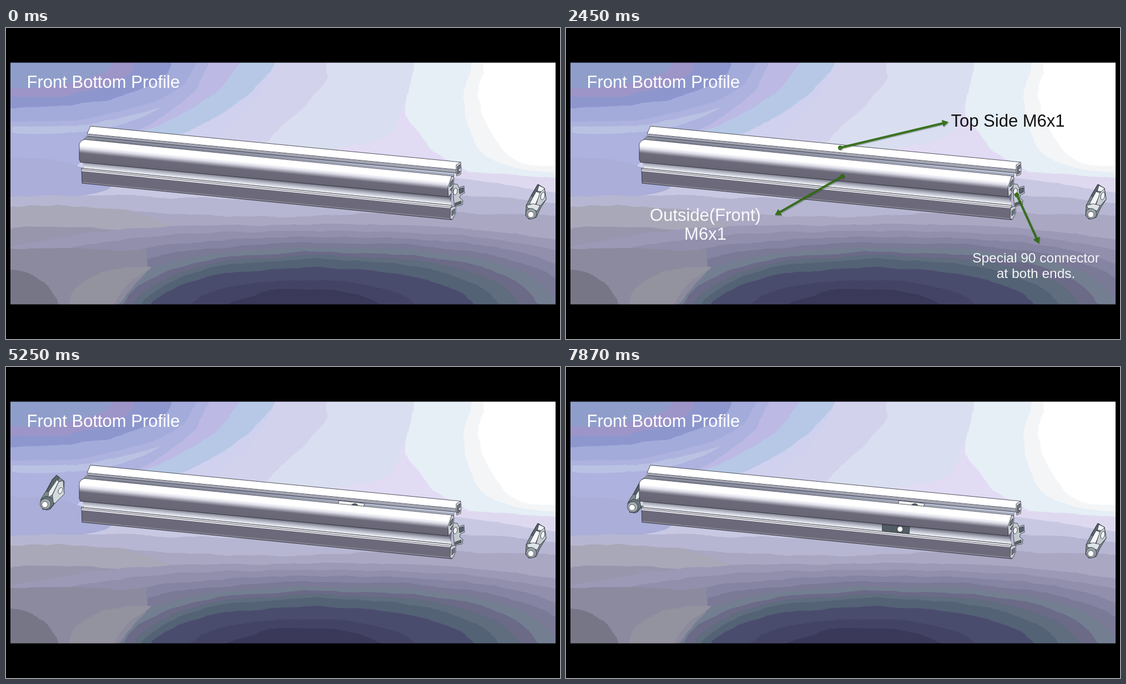
Animation of 998x561 px, one loop 8000 ms. Source, as an HTML page:

```html
<!DOCTYPE html>
<html lang="en">
<head>
<meta charset="utf-8">
<title>Front Bottom Profile</title>
<style>
html, body { margin: 0; width: 100%; height: 100%; overflow: hidden; background: #000; }
svg { display: block; width: 100vw; height: 100vh; }
text { font: 31px "Liberation Sans", Arial, sans-serif; }
.mid { text-anchor: middle; }
.small { font-size: 24.5px; }
.line { stroke: #2a2d35; stroke-width: .8; stroke-linejoin: round; }
</style>
</head>
<body>
<svg viewBox="0 0 998 561">
  <defs>
    <clipPath id="panel"><rect x="8" y="62.5" width="982" height="436"/></clipPath>
    <filter id="ragged" filterUnits="userSpaceOnUse" x="-40" y="20" width="1080" height="530" color-interpolation-filters="sRGB">
      <feTurbulence type="fractalNoise" baseFrequency=".012 .03" numOctaves="3" seed="8"/>
      <feDisplacementMap in="SourceGraphic" scale="9" xChannelSelector="R" yChannelSelector="G"/>
    </filter>
    <linearGradient id="front" gradientUnits="userSpaceOnUse" x1="500" y1="237" x2="496" y2="277">
      <stop offset=".28" stop-color="#fff"/><stop offset=".42" stop-color="#dadbe6"/>
      <stop offset=".62" stop-color="#6c6a7a"/><stop offset="1" stop-color="#686675"/>
    </linearGradient>
    <linearGradient id="slot" gradientUnits="userSpaceOnUse" x1="500" y1="276" x2="498.6" y2="290">
      <stop offset="0" stop-color="#70707f"/><stop offset=".35" stop-color="#a9acba"/>
      <stop offset=".8" stop-color="#e6e8ef"/><stop offset="1" stop-color="#f6f7fa"/>
    </linearGradient>
    <linearGradient id="groove" gradientUnits="userSpaceOnUse" x1="500" y1="225" x2="499" y2="238">
      <stop offset="0" stop-color="#8a8d9c"/><stop offset=".5" stop-color="#9599ab"/>
      <stop offset="1" stop-color="#c3c9da"/>
    </linearGradient>
  </defs>

  <rect width="998" height="561"/>
  <g clip-path="url(#panel)">
    <g id="backdrop" filter="url(#ragged)">
      <rect x="-40" y="20" width="1080" height="530" fill="#d9dff0"/>
      <path fill="#d3d2ec" d="M578 20V90C565 120 520 150 470 205L-40 300V20Z"/>
      <path fill="#e2dbf4" d="M735 95C715 140 705 180 690 195S560 215 470 260H850C780 240 740 190 722 150Z"/>
      <path fill="#e6eef6" d="M735 20V80C720 130 715 150 725 165C745 195 755 205 790 235L850 268 1040 300V20Z"/>
      <path fill="#f4f5f7" d="M838 20V70C815 130 825 180 850 215S920 252 1040 268V20Z"/>
      <path fill="#fff" d="M858 20V80C840 130 865 185 890 215S940 250 1040 250V20Z"/>
      <path fill="#cfd1ee" d="M484 20V62C470 130 400 180 340 225L-40 320V20Z"/>
      <path fill="#b7c8e6" d="M484 20V65C462 110 385 160 320 190L100 230-40 250V20Z"/>
      <path fill="#bcb9e5" d="M420 20V62C402 110 340 145 280 175L-40 290V20Z"/>
      <path fill="#adb2de" d="M366 20V62C352 110 320 135 270 168S120 225 90 300H-40V20Z"/>
      <path fill="#b9c2e3" d="M8 178C110 182 210 168 280 142C230 180 130 196 8 190Z"/>
      <path fill="#dfd9f0" d="M440 262C580 235 800 256 1040 274V560H440Z"/>
      <path fill="#c8c8e3" d="M-40 268C140 255 420 278 620 268S900 290 1040 302V560H-40Z"/>
      <path fill="#aaaed9" d="M-40 235C80 225 140 250 180 275S100 310-40 312Z"/>
      <path fill="#b7b6d2" d="M-40 308C140 290 430 318 660 306S900 312 1040 318V560H-40Z"/>
      <path fill="#a9a7c2" d="M-40 332C200 315 380 350 580 338S860 336 1040 340V560H-40Z"/>
      <path fill="#a9a8b9" d="M-40 330C90 312 240 318 310 365L240 395-40 390Z"/>
      <path fill="#9796ad" d="M-40 366C90 345 240 376 330 366L370 560H-40Z"/>
      <g id="floor"/>
      <path fill="#8c8a9e" d="M-40 405C70 388 150 405 255 398C250 420 265 430 240 455L190 510H-40Z"/>
      <path fill="#767687" d="M-40 440C30 425 90 455 95 510H-40Z"/>
      <path fill="#93939f" d="M110 510C120 445 190 428 262 432C230 455 200 470 190 510Z"/>
    </g>

    <g id="nutLeft"/>
    <g id="joint" class="line">
      <path fill="#7c888d" d="M62 240 73 222 84 202 91 195 96 199 105 206 104 229 88 246 80 256 66 257Z"/>
      <path fill="#59656b" d="M73 225 84 202 91 195 96 199 83 223Z"/>
      <path fill="#e9edef" d="M77 225 92 203 95 207 83 231 76 235Z"/>
      <path fill="#d3dadd" d="M95 207 103 205 105 229 88 246 84 244 84 230Z"/>
      <ellipse cx="98" cy="223" rx="3.500" ry="6" fill="#f4f6f7" transform="rotate(25 98 223)"/>
      <path fill="#6b777d" d="M64 238 72 233 84 237 86 247 78 257 72 258Z"/>
      <circle cx="71" cy="247" r="9.500" fill="#a3aeb2"/>
      <circle cx="70" cy="248" r="5.500" fill="#fff"/>
    </g>

    <g class="line">
      <path fill="#7c888d" d="M937 320 946 302 958 282 970 289 973 309 963 325 955 342 942 345 936 338Z"/>
      <path fill="#59656b" d="M946 303 958 282 962 284 951 306Z"/>
      <path fill="#f1f4f5" d="M960 284 970 289 968 296 957 294Z"/>
      <path fill="#f4f6f7" d="M943 317 955 295 963 298 953 320Z"/>
      <path fill="#c5ced2" d="M962 297 970 290 973 309 962 321 954 321Z"/>
      <ellipse cx="967" cy="303" rx="3.500" ry="7" fill="#f1f4f5" transform="rotate(15 967 303)"/>
      <path fill="#dde3e6" d="M938 320 949 317 962 320 957 330 940 325Z"/>
      <circle cx="946" cy="335" r="9.500" fill="#98a4a9"/>
      <circle cx="945.500" cy="336.500" r="5.500" fill="#fff"/>
    </g>

    <!-- rail body -->
    <path fill="#6c6a7a" d="M147 193 808 258 800 325 140 262 136 205Z"/>
    <path fill="url(#groove)" d="M147 192 812 256 804 268 141 202Z"/>
    <path class="line" fill="#fff" d="M152 177 819 242 812 255.500 146 191Z"/>
    <path fill="#a3a5b2" d="M146 191.500 812 256 812 261 147 195.500Z"/>
    <path stroke="#363846" stroke-width=".9" d="M147 195.500 811 261.500"/>
    <path stroke="#5e6377" stroke-width=".7" d="M160 201 806 265"/>
    <path fill="url(#slot)" d="M139 241 798 304 804 324 142 256 139 250Z"/>

    <!-- end face -->
    <path class="line" fill="#c3c9cf" d="M805 281 813 282 816 288 825 285 826 298 819 301 817 306 823 311 822 319 808 322 806 305Z"/>
    <path class="line" fill="#59636a" d="M816 290 824 288 824 296 817 299ZM809 316 820 312 820 317 809 320Z"/>
    <ellipse class="line" cx="809.500" cy="295" rx="3.500" ry="6" fill="#eef0f2" transform="rotate(12 809.500 295)"/>
    <path class="line" fill="#d5d9de" d="M811 247 819 242 820 253 819 264 812 267 811 260Z"/>
    <path class="line" fill="#6f7980" d="M813 250 818 246 818 253 815 255 815 259 818 258 817 262 813 264Z"/>

    <g id="nutTop"/>
    <g id="nutFront"/>

    <path class="line" fill="url(#front)" d="M141 201 803 267 797 291 797 304.500 134 242 132 237 132 209 135 204Z"/>
    <path class="line" fill="#c9ced5" d="M803 267 807 270 806 284 800 292 804 296 797 305 796 288Z"/>
    <path class="line" fill="#6f7980" d="M799 287 801 278 805 273 804 283Z"/>

    <path class="line" fill="#6c6a7a" d="M136 253 803 320 803 346 137 280Z"/>
    <path fill="#f1f2f6" d="M137 253 803 320 800 325 136 258Z"/>
    <path stroke="#343440" stroke-width=".8" d="M136 253 803 320M136 255.500 801 323"/>
    <path stroke="#a9a9b4" stroke-width=".8" d="M138 278.500 800 344"/>
    <path class="line" fill="#c9ced5" d="M801 324 810 321 810 333 804 346 800 343Z"/>
    <path class="line" fill="#6f7980" d="M803 339V330L808 326V334Z"/>

    <text x="37.500" y="108" fill="#fff">Front Bottom Profile</text>
  </g>

  <g id="notes">
    <g id="arrows"/>
    <text x="693.500" y="178">Top Side M6x1</text>
    <g fill="#fff" class="mid">
      <text x="251" y="348">Outside(Front)</text>
      <text x="251" y="382">M6x1</text>
      <text class="small" x="846.500" y="423">Special 90 connector</text>
      <text class="small" x="846.500" y="451">at both ends.</text>
    </g>
  </g>
</svg>
<script>
const LOOP = 8000, FRAME = 130;
const $ = id => document.getElementById(id);
const add = (parent, tag, attrs) => {
  const el = document.createElementNS('http://www.w3.org/2000/svg', tag);
  for (const k in attrs) el.setAttribute(k, attrs[k]);
  return parent.appendChild(el);
};

// Floor contours: left, right, top, colour
const contours = [
  [-160, 1220, 354, '#9b99b6'], [-60, 1150, 366, '#918fac'],
  [60, 1085, 377, '#8584a2'], [130, 1035, 388, '#7a7996'],
  [175, 1000, 397, '#737f91'], [205, 965, 405, '#6b6a87'],
  [225, 930, 412, '#5f6d7e'], [240, 890, 419, '#536275'],
  [255, 848, 433, '#4a4c6d'], [325, 745, 454, '#434465'],
  [390, 686, 469, '#3a395a']
];
for (const [l, r, top, fill] of contours) {
  const w = r - l, mid = (l + r) / 2;
  const d = `M${l} 505C${l + w * .05} ${top + 25} ${l + w * .22} ${top} ${mid} ${top}` +
    `S${r - w * .05} ${top + 25} ${r} 505Z`;
  add($('floor'), 'path', { d, fill });
}

// Corner contours: radii, colour
const corner = [
  [310, 112, '#a3abdb'], [268, 86, '#8d97ce'],
  [200, 68, '#9d95c8'], [160, 50, '#8f9dca']
];
for (const [rx, ry, fill] of corner)
  add($('backdrop'), 'ellipse', { cx: 32, cy: 58, rx, ry, fill });

const shape = (id, d, fill) => add($(id), 'path', { d, fill, class: 'line' });
shape('nutTop', 'M0 10 46 15V19L0 14Z', '#78858c');
shape('nutTop', 'M4-1 50 4 46 15 0 10Z', '#f3f5f6');
add($('nutTop'), 'ellipse', { cx: 32, cy: 8, rx: 6, ry: 3.5, fill: '#59646b', class: 'line' });
shape('nutFront', 'M0 0 49 4.5 48 28 0 24Z', '#505d63');
add($('nutFront'), 'circle', { cx: 32, cy: 8.5, r: 5, fill: '#fff', class: 'line' });
shape('nutLeft', 'M3 0 48 4.5V19L0 15V4Z', '#647178');
shape('nutLeft', 'M3 0 48 4.5 46 9 0 4Z', '#e9edef');

function arrow(x1, y1, x2, y2) {
  const len = Math.hypot(x2 - x1, y2 - y1);
  const angle = Math.atan2(y2 - y1, x2 - x1) * 180 / Math.PI;
  const d = `M0-2H${len - 11}V-6.5L${len} 0 ${len - 11} 6.5V2H0Z`;
  for (const [shift, fill, opacity] of [[1.5, '#30343b', 0.3], [0, '#2f690f', 1]]) {
    const g = add($('arrows'), 'g', {
      transform: `translate(${x1 + shift} ${y1 + shift}) rotate(${angle})`, fill, opacity
    });
    add(g, 'path', { d });
    add(g, 'circle', { r: 4 });
  }
}
arrow(494, 216, 689, 169.5);
arrow(498, 267.5, 376, 337.5);
arrow(812, 301, 852, 389);

const clamp = (v, lo, hi) => Math.max(lo, Math.min(hi, v));
const ramp = (t, start) => clamp(Math.floor((t - start) / 30) + 1, 0, 15) / 15;

// Moves a part by (dx, dy) per step from (x, y), holding after the last step
function slide(id, t, start, last, x, y, dx, dy) {
  const k = Math.floor((t - start) / FRAME);
  const n = clamp(k, 0, last);
  $(id).style.display = k < 0 ? 'none' : '';
  $(id).setAttribute('transform', `translate(${x + dx * n} ${y + dy * n})`);
}

function draw(t) {
  $('notes').setAttribute('opacity', ramp(t, 30) - ramp(t, 2450));
  slide('nutTop', t, 3030, 9, 965, 279, -41, -4.1);
  slide('joint', t, 4860, 5, -73.5, -8, 24.5, 2.7);
  slide('nutLeft', t, 6310, 4, -5, 202, 41, 4);
  slide('nutFront', t, 7090, 6, 973, 317, -67.2, -5.5);
}

const begin = performance.now();
function tick() {
  draw((performance.now() - begin) % LOOP);
  requestAnimationFrame(tick);
}
tick();
</script>
</body>
</html>
```
